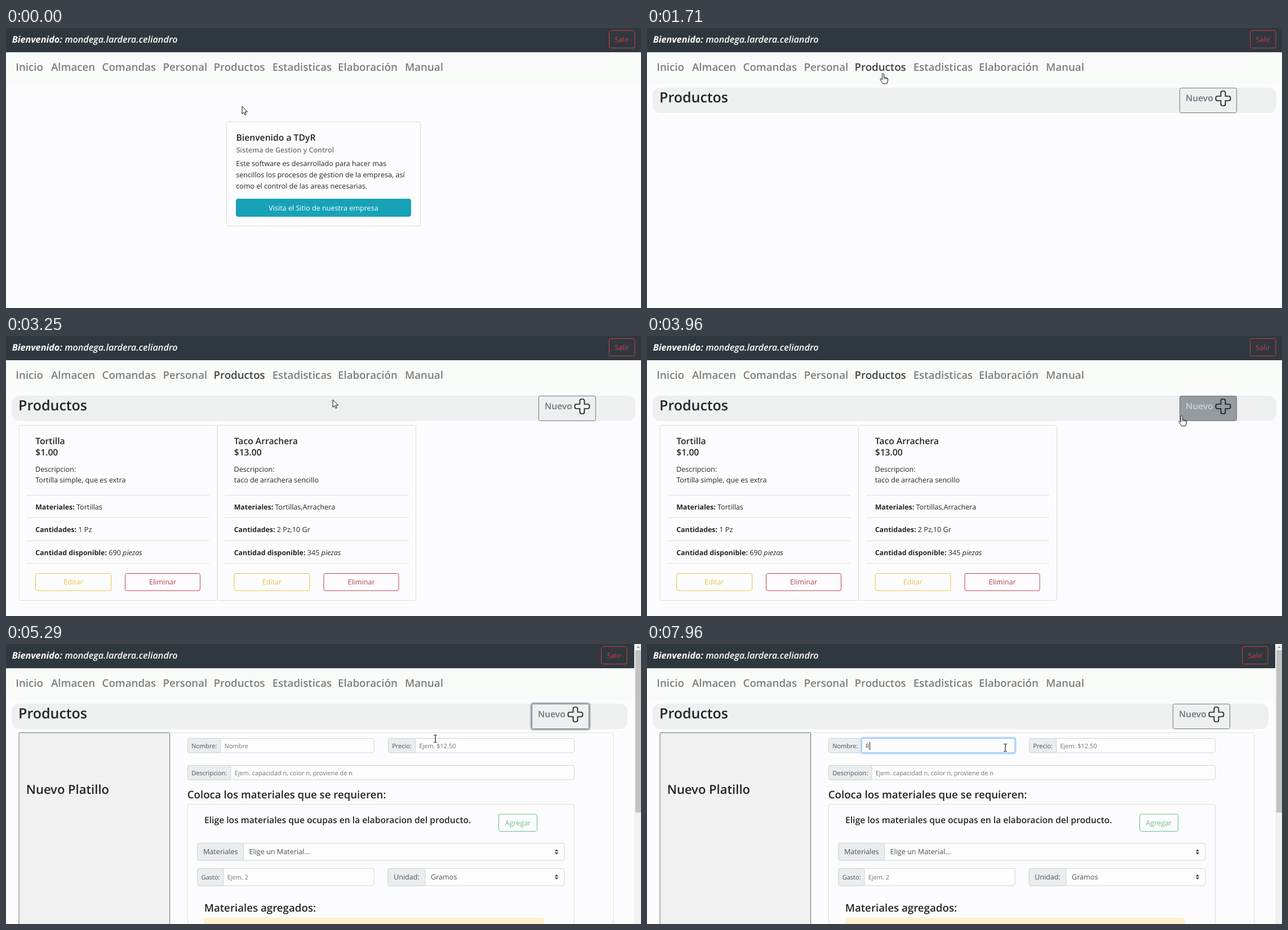
Animation of 1127x497 px, one loop 8000 ms. Source, as an HTML page:

```html
<!DOCTYPE html>
<html lang="es">
<head>
<meta charset="utf-8">
<title>Productos</title>
<style>
  html, body { margin: 0; width: 100%; height: 100%; overflow: hidden; background: #fcfcfe; }
  svg { display: block; width: 100%; height: 100%; }
  text { font-family: "Open Sans", "Noto Sans", sans-serif; font-size: 12.6px; fill: #212529;
         text-rendering: geometricPrecision; white-space: pre; }
  .h { font-weight: 600; }
  .b { font-weight: 700; font-size: 12.4px; }
  .i { font-style: italic; }
  .s { font-size: 11px; }
  .mid { text-anchor: middle; }
  .label { fill: #495057; }
  .hint { fill: #6c757d; }
</style>
</head>
<body>
<svg id="stage" viewBox="0 0 1127 497" xmlns="http://www.w3.org/2000/svg"></svg>
<script>
const LOOP = 8000;
const INK = '#212529', GREY = [108, 117, 125], BORDER = '#dcdde0', FIELD = '#ced4da';

const greyAlpha = alpha => `rgba(${GREY},${alpha})`;
const text = (x, y, str, cls = '', attrs = '') =>
  `<text x="${x}" y="${y}" class="${cls}" ${attrs}>${str}</text>`;
const heading = (x, y, size, str, fill = INK) =>
  text(x, y, str, 'h', `style="font-size:${size}px;fill:${fill}"`);
const box = (x1, y1, x2, y2, stroke = BORDER, fill = 'none', r = 3, attrs = '') =>
  `<rect x="${x1}" y="${y1}" width="${x2 - x1}" height="${y2 - y1}" rx="${r}" fill="${fill}" stroke="${stroke}" ${attrs}/>`;
const button = (x1, y1, x2, y2, str, color, fill = 'none', ink = color) =>
  box(x1, y1, x2, y2, color, fill) +
  text((x1 + x2) / 2, (y1 + y2) / 2 + 4.7, str, 'mid', `style="fill:${ink}"`);
const group = (id, body) => `<g id="${id}">${body}</g>`;

// Input group: grey label on the left, value or hint on the right
function field(x1, y1, x2, y2, split, label, value, cls, id = '') {
  const y = (y1 + y2) / 2 + (cls ? 4.3 : 4.7);
  const pad = cls ? 6.7 : 10;
  return box(x1, y1, x2, y2, FIELD, '#fdfdfe') +
    box(x1, y1, split, y2, FIELD, '#e9edee') +
    text(x1 + pad, y, label, cls + ' label') +
    text(split + pad, y, value, cls + (cls ? ' hint' : ' label'), id && `id="${id}"`);
}
const selectArrow = (x, y) =>
  `<path d="M${x - 3.2} ${y - 1}l3.2-3.6 3.2 3.6zm0 2l3.2 3.6 3.2-3.6z" fill="#343a40"/>`;

const navItems = [['Inicio', 17.3], ['Almacen', 80], ['Comandas', 170.6], ['Personal', 278.5],
  ['Productos', 368.5], ['Estadisticas', 472.7], ['Elaboración', 589], ['Manual', 708]];

const header =
  '<rect width="1127" height="43" fill="#2f383e"/><rect y="43" width="1127" height="56.5" fill="#f9fbf9"/>' +
  text(10.7, 26, '<tspan font-weight="700">Bienvenido: </tspan><tspan font-weight="600">mondega.lardera.celiandro</tspan>',
    'i', 'style="font-size:16.2px;fill:#fff"') +
  group('exit', button(1070.5, 4.5, 1116, 35.5, 'Salir', '#d23c46')) +
  navItems.map(([name, x]) => text(x, 76, name, 'h nav', 'style="font-size:18.7px"')).join('');

const home =
  box(391.5, 166.5, 735.5, 351.5) +
  heading(408.5, 199.5, 15.7, 'Bienvenido a TDyR') +
  heading(408.7, 221, 12.5, 'Sistema de Gestion y Control', '#6c757d') +
  ['Este software es desarrollado para hacer mas',
   'sencillos los procesos de gestion de la empresa, así',
   'como el control de las areas necesarias.'].map((line, i) => text(408.3, 245 + i * 20, line)).join('') +
  button(408.5, 303.5, 718.5, 334.5, 'Visita el Sitio de nuestra empresa', '#17a2b8', '#17a2b8', '#fff');

const titleBar =
  '<rect id="bar" x="10" y="106" height="45" rx="13" fill="#eeefef"/>' +
  heading(22, 132, 25, 'Productos') +
  group('add',
    box(943.8, 104.8, 1048.2, 152.2, greyAlpha(.5), 'none', 4, 'id="addRing" stroke-width="2.6"') +
    box(945.5, 106.5, 1046.5, 150.5, '#6c757d', 'none', 3, 'id="addBox"') +
    text(955.9, 129.5, 'Nuevo', 'h', 'id="addText" style="font-size:15.7px"') +
    '<path transform="translate(1022.5 125)" fill="none" stroke="#16181a" stroke-width="1.7" d="M-4-10q0-3 3-3h2q3 0 3 3v6h6q3 0 3 3v2q0 3-3 3h-6v6q0 3-3 3h-2q-3 0-3-3v-6h-6q-3 0-3-3v-2q0-3 3-3h6z"/>');

function productCard(dx, name, price, about, materials, amounts, stock) {
  const rows = [['Materiales:', materials], ['Cantidades:', amounts],
    ['Cantidad disponible:', `${stock} <tspan class="i">piezas</tspan>`]];
  return `<g transform="translate(${dx})">` +
    box(23, 158.5, 375, 469.5) +
    heading(52.2, 192, 15.7, name) + heading(52.2, 211.5, 15.7, price) +
    text(52, 240.5, 'Descripcion:') + text(52.2, 260, about) +
    rows.map(([key, value], i) => text(52.2, 307.5 + i * 40.6, `<tspan class="b">${key}</tspan> ${value}`)).join('') +
    [0, 1, 2, 3].map(i => `<path d="M36 ${Math.round(281.5 + i * 40.6) + .5}h325" stroke="${BORDER}"/>`).join('') +
    button(52.5, 421.5, 186.5, 452, 'Editar', '#e9c340') +
    button(211.5, 421.5, 344.5, 452, 'Eliminar', '#b9404a') + '</g>';
}
const cards =
  productCard(0, 'Tortilla', '$1.00', 'Tortilla simple, que es extra', 'Tortillas', '1 Pz', 690) +
  productCard(352.5, 'Taco Arrachera', '$13.00', 'taco de arrachera sencillo', 'Tortillas,Arrachera', '2 Pz,10 Gr', 345);

const form =
  box(291, 157.5, 1078, 600) +
  box(23, 157.5, 290.5, 600, '#6c757d', '#f0f1f0', 1) +
  heading(35.7, 266, 22, 'Nuevo Platillo') +
  field(322.5, 167.5, 653, 193, 381, 'Nombre:', 'Nombre', 's', 'nameText') +
  group('focus',
    box(379.8, 166.2, 654.3, 194.3, '#bfdeff', 'none', 3.5, 'stroke-width="2.7"') +
    box(381, 167.5, 653, 193, '#80bdff', 'none', 2)) +
  '<path id="caret" d="M0 174v14" stroke="#222"/>' +
  field(678.5, 167.5, 1008.5, 193, 726.5, 'Precio:', 'Ejem. $12.50', 's') +
  field(322.5, 215.5, 1008.5, 241, 399, 'Descripcion:', 'Ejem. capacidad n, color n, proviene de n', 's') +
  heading(321.8, 274, 18.65, 'Coloca los materiales que se requieren:') +
  box(322.5, 284.5, 1008.5, 600) +
  heading(352, 318, 15.65, 'Elige los materiales que ocupas en la elaboracion del producto.') +
  button(874.5, 302, 942.5, 332.5, 'Agregar', '#6abf82') +
  field(340, 353.5, 991, 384, 421.5, 'Materiales', 'Elige un Material...', '') + selectArrow(977, 369) +
  field(340, 398.5, 653, 429, 386, 'Gasto:', 'Ejem. 2', 's') +
  field(678, 398.5, 991, 429, 744, 'Unidad:', 'Gramos', '') + selectArrow(977, 413.5) +
  heading(351.7, 475, 18.7, 'Materiales agregados:') +
  box(352.5, 486.5, 954, 600, '#ffeeba', '#fdf2cd') +
  '<rect x="1115" width="12" height="497" fill="#f1f1f1"/><rect x="1117" y="11" width="10" height="288" fill="#c1c1c1"/>' +
  '<path d="M1119 7l3-3.5 3 3.5z" fill="#a0a0a0"/>';

const pointers = {
  arrow: '<path d="M0 0v13.5l3.1-2.9 2.1 4.9 2.1-.9-2.1-4.7h4.3z" fill="#fff" stroke="#111"/>',
  hand: '<path d="M-1.5 1.5q1.5-2 3 0v6l5.5 1.3q2 .7 1.7 2.7l-.9 4.5-1 2.8h-7q-1-2-2.5-3.6l-2.3-3.6q-.3-1.8 1.5-1.4l2 1.7z" fill="#fff" stroke="#111"/><path d="M1.5 7v3.5M4 8v3M6.5 9v2.5" stroke="#111" stroke-width=".9"/>',
  beam: '<path d="M-3-6.5h2l1 .7 1-.7h2M0-6v12M-3 6.5h2l1-.7 1 .7h2" fill="none" stroke="#222" stroke-width="1.2"/>'
};

const stage = document.getElementById('stage');
stage.innerHTML = '<rect width="1127" height="497" fill="#fcfcfe"/>' + header +
  group('home', home) + group('titleBar', titleBar) + group('cards', cards) + group('form', form) +
  Object.entries(pointers).map(([id, body]) => group(id, body)).join('');

const el = id => document.getElementById(id);
const show = (id, on) => el(id).setAttribute('visibility', on ? 'visible' : 'hidden');
const move = (id, x, y = 0) => el(id).setAttribute('transform', `translate(${x} ${y})`);
const navTexts = [...document.querySelectorAll('.nav')];

const clamp = v => Math.min(1, Math.max(0, v));
const ramp = (t, start, length) => clamp((t - start) / length);
const smooth = p => p * p * (3 - 2 * p);

// Page events, in ms
const AT = { productsHover: 1200, products: 1710, cards: 2670, addHover: 3880, form: 4430,
  addLeave: 4950, nameFocus: 5980, typed: 7700 };

// time, x, y of the pointer tip
const route = [[0, 419, 139], [920, 419, 139], [1290, 409, 80], [1460, 409, 80], [1540, 419, 80],
  [2250, 419, 80], [2460, 562, 82], [3000, 562, 82], [3250, 580, 113], [3960, 949, 141],
  [4250, 999, 138], [4670, 999, 138], [5700, 636, 184], [LOOP, 636, 184]];

function pointerAt(t) {
  const i = route.findIndex(stop => stop[0] > t);
  const [t0, x0, y0] = route[i - 1], [t1, x1, y1] = route[i];
  const p = smooth((t - t0) / (t1 - t0));
  return [x0 + (x1 - x0) * p, y0 + (y1 - y0) * p];
}

function pointerKind(t, x, y, onStats) {
  const onProducts = t >= AT.productsHover && y < 93 && x < 461;
  if (onProducts || onStats || (t >= AT.addHover && t < AT.addLeave)) return 'hand';
  const inRow = y > 167 && y < 193;
  return t >= AT.form && inRow && (x < 653 || x > 726) ? 'beam' : 'arrow';
}

function draw(t) {
  const isForm = t >= AT.form, focused = t >= AT.nameFocus, typed = t >= AT.typed;
  const [x, y] = pointerAt(t);
  const onStats = x > 473 && x < 577 && y < 93;

  show('home', t < AT.products);
  show('titleBar', t >= AT.products);
  show('cards', t >= AT.cards && !isForm);
  show('form', isForm);
  navTexts.forEach((node, i) => {
    const dark = (i === 4 && t >= AT.productsHover && !isForm) || (i === 5 && onStats);
    node.style.fill = dark ? '#404243' : '#7c7e7e';
  });

  move('exit', isForm ? -14 : 0);
  move('add', isForm ? -12 : 0);
  el('bar').setAttribute('width', isForm ? 1093 : 1107);
  const hover = smooth(ramp(t, AT.addHover, 130)) - smooth(ramp(t, AT.addLeave, 150));
  el('addBox').setAttribute('fill', greyAlpha(hover));
  el('addText').style.fill = `rgb(${GREY.map(c => Math.round(c + (255 - c) * hover))})`;
  show('addRing', isForm && !focused);

  show('focus', focused);
  const name = el('nameText');
  name.textContent = typed ? 'R' : 'Nombre';
  name.style.fill = typed ? '#495057' : '#6c757d';
  const blink = (t - (typed ? AT.typed : AT.nameFocus)) % 1060 < 530;
  show('caret', focused && blink);
  move('caret', typed ? 395.5 : 388.5);

  const kind = pointerKind(t, x, y, onStats);
  for (const id in pointers) show(id, id === kind);
  move(kind, Math.round(x), Math.round(y));
}

function tick(now) {
  draw(now % LOOP);
  requestAnimationFrame(tick);
}
draw(0);
requestAnimationFrame(tick);
</script>
</body>
</html>
```
